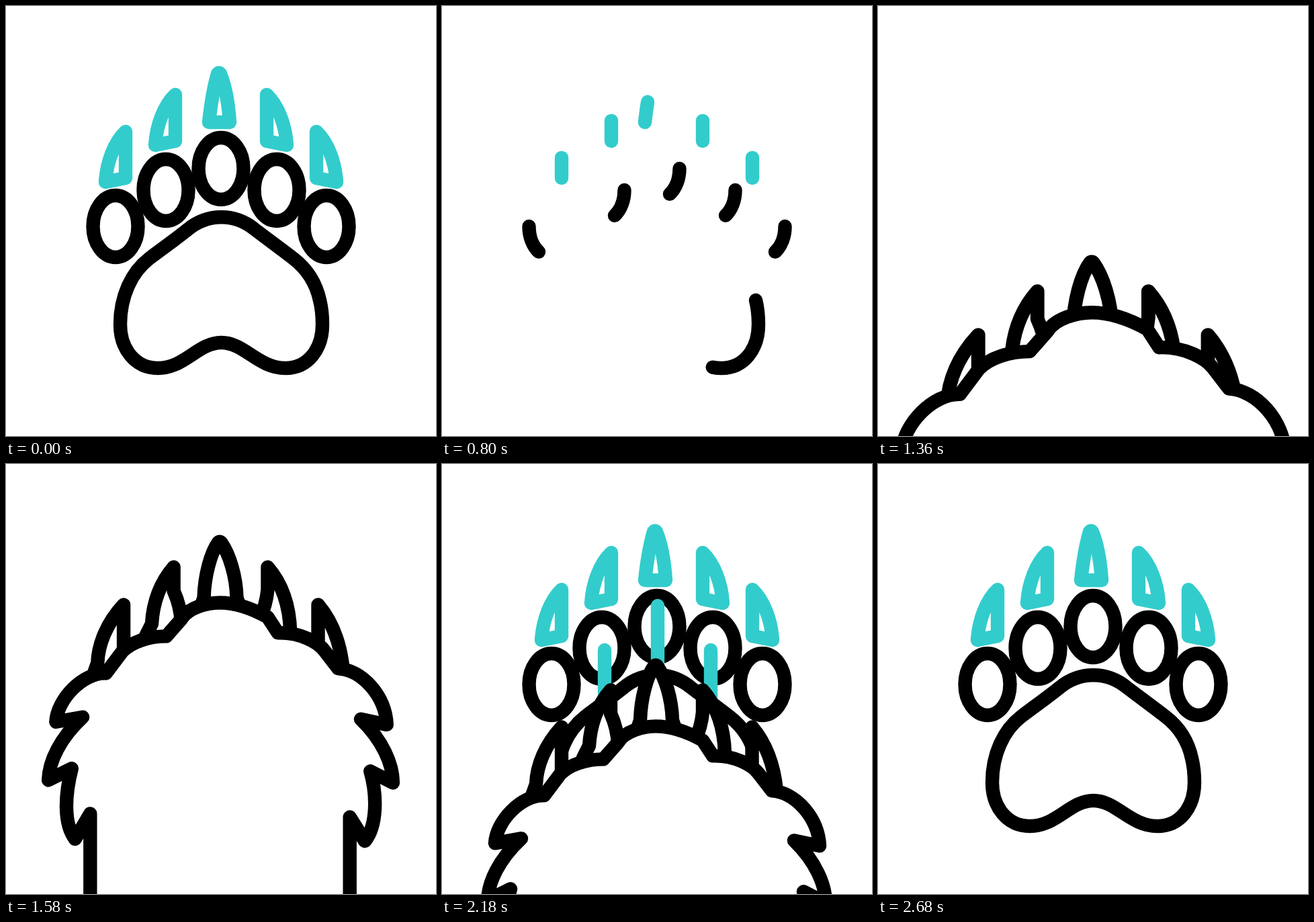
These frames come from a looping animation (640x640 px, 3 s). An HTML page:

```html
<!DOCTYPE html>
<html lang="en">
<head>
<meta charset="utf-8">
<title>Bear paw</title>
<style>
  html, body { margin: 0; width: 100%; height: 100%; overflow: hidden; background: #fff; }
  svg { display: block; width: 100vw; height: 100vh; }
  path { stroke-width: 20.4; stroke-linecap: round; stroke-linejoin: round; }
  #icon path, #marks path { fill: none; }
  #paw path { fill: #fff; stroke: #000; }
</style>
</head>
<body>
<svg viewBox="0 0 640 640">
  <g id="icon"></g>
  <g id="marks"></g>
  <g id="paw">
    <g id="claws">
      <path d="M134 352L140 335C141 308 153 277 178 250V340"/>
      <path d="M210 296L219 278C221 245 232 217 251 195V230Q261 252 262 276"/>
      <path d="M290 255L295 240C296 207 305 174 316 159Q318 157 320 159C332 176 342 207 343 240L348 255"/>
      <path d="M376 272Q386 250 388 228V195C408 218 420 250 421 290"/>
      <path d="M461.500 310V250C482 274 494 305 498 345"/>
    </g>
    <path d="M129 860V557L107 594C90 572 92 530 102 491L68 508C69 480 85 447 118 416L79 423C81 390 118 351 152 352L176 320C190 306 215 298 240 298L262 273C272 256 300 249 318 249C345 249 370 260 388 270L403 293C436 292 462 307 471 319L491 345C526 347 560 385 562 427L524 419C556 450 571 485 571 512L538 495C548 530 548 575 530 597L508 562V860"/>
  </g>
</svg>
<script>
const LOOP = 3000, INK = '#000', TEAL = '#3cc';
const $ = id => document.getElementById(id);
const icon = $('icon'), marks = $('marks'), paw = $('paw'), claws = $('claws');

function addPath(parent, color, d) {
  const p = document.createElementNS('http://www.w3.org/2000/svg', 'path');
  p.setAttribute('d', d);
  p.setAttribute('stroke', color);
  parent.append(p);
  return p;
}

// Ellipse starting at its right (side 1) or left (side -1) point, heading down.
function toe(cx, cy, side) {
  const r = 33.5 * side, arc = x => `A33.5 46 0 0 ${side > 0 ? 1 : 0} ${x} ${cy}`;
  return `M${cx + r} ${cy}${arc(cx - r)}${arc(cx + r)}Z`;
}

// Side claw: straight inner edge, curved outer edge.
function nail(x, y, side) {
  const X = d => x + d * side;
  return `M${x} ${y + 69}V${y}C${X(17)} ${y + 16} ${X(28)} ${y + 45} ${X(30)} ${y + 75}Z`;
}

const outlines = [
  [INK, 'M467 438C470 450 471 462 471 474C471 510 450 539 416 539C375 539 355 501 320.5 501' +
        'C286 501 266 539 226 539C192 539 170 510 170 474C170 432 187 396 213 376' +
        'C230 363 250 349 270 333C300 308 341 308 371 333C392 349 410 362 428 376C450 393 462 415 467 438Z'],
  [INK, toe(163, 328, -1)],
  ...[[238, 274], [320, 242], [403, 274], [477, 328]].map(([x, y]) => [INK, toe(x, y, 1)]),
  [TEAL, nail(178, 187, -1)],
  [TEAL, nail(252, 132, -1)],
  [TEAL, 'M302 173C305 145 310 118 315 101Q317 98 319 101C326 118 331 145 333 173Z'],
  [TEAL, nail(388, 132, 1)],
  [TEAL, nail(462, 187, 1)]
].map(([color, d]) => {
  const p = addPath(icon, color, d);
  p.setAttribute('pathLength', 1);
  return p;
});

// x, top, offset of the drawing tip from the body line
const scratches = [[242, 277, -32], [321, 211, -78], [400, 277, -32]]
  .map(([x, top, tip]) => ({ x, top, tip, el: addPath(marks, TEAL, '') }));

// Symmetric ease-in-out between two times; a is the handle length.
function ease(t, from, to, a) {
  const x = Math.min(1, Math.max(0, (t - from) / (to - from)));
  let lo = 0, hi = 1;
  for (let i = 0; i < 24; i++) {
    const s = (lo + hi) / 2, r = 1 - s;
    if (3 * a * s * r * r + 3 * (1 - a) * s * s * r + s ** 3 < x) lo = s; else hi = s;
  }
  const s = (lo + hi) / 2;
  return s * s * (3 - 2 * s);
}

function show(el, on) { el.setAttribute('visibility', on ? 'visible' : 'hidden'); }

function render(t) {
  // Icon: erased along its strokes, whole again while the paw covers it.
  const left = t >= 1680 ? 1 : 1 - ease(t, 0, 1080, 1 / 3);
  show(icon, left > 0.0005);
  for (const p of outlines) {
    if (left > 0.9995) p.removeAttribute('stroke-dasharray');
    else p.setAttribute('stroke-dasharray', `${left} 2`);
  }

  // Paw: rises wide with claws spread and half drawn in, then swipes down.
  const q = 1 - ease(t, 1052, 1678, 0.5);
  const scale = 1 + 0.32 * q ** 0.85;
  const y = 187 + 525 * q + 590 * ease(t, 1787, 2725, 0.5);
  show(paw, t > 1052 && t < 2680);
  paw.setAttribute('transform', `translate(318 ${y}) scale(${scale}) translate(-318 -249)`);
  claws.setAttribute('transform', `translate(318 ${53 * q}) scale(${1 + 0.04 * q} 1) translate(-318 0)`);
  paw.querySelectorAll('path').forEach(p => p.style.strokeWidth = 20.4 / scale);

  // Scratches follow the claws, then shrink downwards.
  const gone = ease(t, 2240, 2680, 1 / 3);
  for (const { x, top, tip, el } of scratches) {
    const start = top + (540 - top) * gone;
    const end = Math.min(540, y + tip);
    show(el, t > 1787 && gone < 0.9995 && end > start);
    el.setAttribute('d', `M${x} ${start}V${end}`);
  }
}

const t0 = performance.now();
function tick() {
  render((performance.now() - t0) % LOOP);
  requestAnimationFrame(tick);
}
render(0);
requestAnimationFrame(tick);
</script>
</body>
</html>
```
